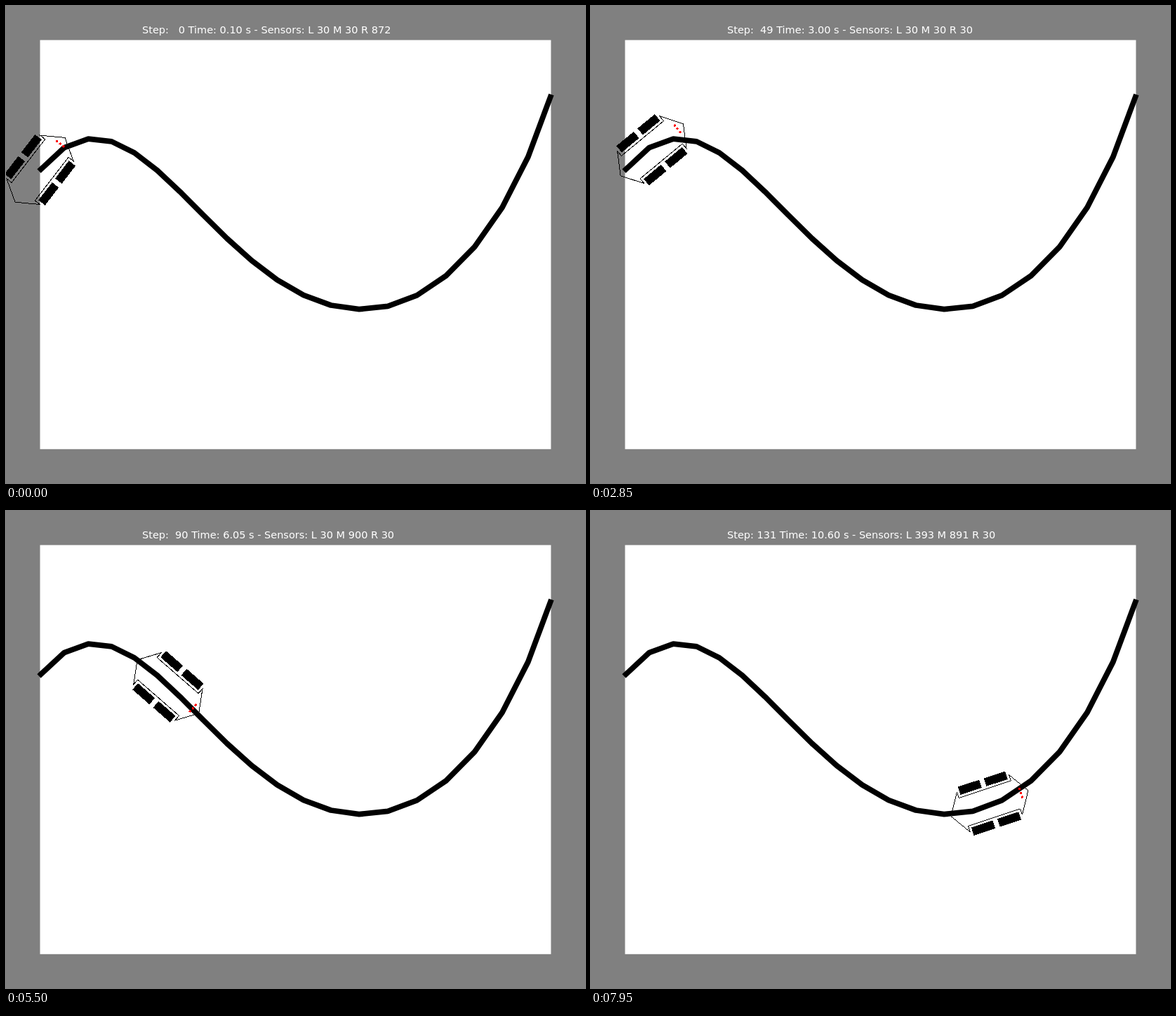
Write an HTML page that moves like this. It is 825x679 px and loops after 8 s.

```html
<!DOCTYPE html>
<html>
<head>
<meta charset="utf-8">
<style>
  html, body { margin: 0; width: 100%; height: 100%; overflow: hidden; background: #808080; }
  svg { display: block; }
  text { font: 14.5px "DejaVu Sans", sans-serif; fill: #fff; white-space: pre; }
</style>
</head>
<body>
<svg width="825" height="679" viewBox="0 0 825 679">
  <rect x="48.5" y="48.5" width="728" height="582.3" fill="#fff"/>
  <polyline id="track" fill="none" stroke="#000" stroke-width="7.8" stroke-linejoin="bevel"/>
  <g id="robot" shape-rendering="crispEdges">
    <path fill="none" stroke="#000" d="M58 0L39 30V21H-39V30L-58 0L-39 -30V-21H39V-30Z"/>
  </g>
  <text id="status" x="194" y="39"></text>
</svg>
<script>
const LOOP = 8000, LAST_STEP = 131;
const TURN = 4.24, STRIDE = 16;
const SENSOR_X = 47, SENSOR_GAP = 6;
const SWEEP = 6;

// The track is a smooth curve through six key points, drawn in 20 straight pieces.
const keys = [[47, 235], [183, 209], [315, 331], [463, 426], [627, 384], [777, 126]];
const curve = u => [0, 1].map(axis => keys.reduce((sum, key, i) =>
  sum + keys.reduce((w, _, j) => j === i ? w : w * (u - j) / (i - j), key[axis]), 0));
const track = Array.from({ length: 21 }, (_, i) => curve(i / 4));

// Steps where the display stalls, for that step and the next one.
const stalls = { 33: 200, 69: 150, 75: 150, 79: 150, 111: 150, 117: 150 };
const warmUp = 'L'.repeat(6) + 'R'.repeat(8) + '-' + 'L'.repeat(9);

const clamp01 = v => Math.max(0, Math.min(1, v));

function heading(angle) {
  const a = angle * Math.PI / 180;
  return [Math.cos(a), Math.sin(a)];
}

function distanceToTrack(x, y) {
  let best = Infinity;
  for (let i = 1; i < track.length; i++) {
    const [ax, ay] = track[i - 1], dx = track[i][0] - ax, dy = track[i][1] - ay;
    const k = clamp01(((x - ax) * dx + (y - ay) * dy) / (dx * dx + dy * dy));
    best = Math.min(best, Math.hypot(x - ax - k * dx, y - ay - k * dy));
  }
  return best;
}

// Left, middle and right reading: 30 on white, 900 on black.
function readSensors({ x, y, angle }) {
  const [c, s] = heading(angle);
  return [-SENSOR_GAP, 0, SENSOR_GAP].map(side => {
    const d = distanceToTrack(x + SENSOR_X * c - side * s, y + SENSOR_X * s + side * c);
    return Math.round(30 + 870 * clamp01((5 - d) / 3));
  });
}

// Follows the line; when it is lost, sweeps left and then right until it is found.
function createPilot() {
  let searched = SWEEP;
  return ([l, m, r]) => {
    if (m < 570 && l < 300 && r < 300) return searched++ < SWEEP ? 'L' : 'R';
    searched = 0;
    return m >= 570 ? 'F' : l > r ? 'L' : 'R';
  };
}

function simulate() {
  const pose = { x: 48.5, y: 233.3, angle: -52.3 };
  const pilot = createPilot();
  const states = [{ ...pose, at: 0, clock: 0.1, sensors: readSensors(pose) }];
  let at = 0, clock = 0.1, previous = '-';
  for (let step = 1; step <= LAST_STEP; step++) {
    const sensors = readSensors(pose);
    const action = warmUp[step - 1] || pilot(sensors);
    if (action === 'F') {
      const [c, s] = heading(pose.angle);
      pose.x += STRIDE * c;
      pose.y += STRIDE * s;
    } else if (action !== '-') {
      pose.angle += action === 'R' ? TURN : -TURN;
    }
    clock += { F: 0.15, '-': 0.2 }[action] || 0.05;
    at += previous === '-' ? 100 : stalls[step] || stalls[step - 1] || 50;
    previous = action;
    states.push({ ...pose, at, clock, sensors });
  }
  return states;
}

const robot = document.getElementById('robot');
const status = document.getElementById('status');

function addBlock(cx, cy, width, height, fill) {
  const block = document.createElementNS('http://www.w3.org/2000/svg', 'rect');
  const attributes = { x: cx - width / 2, y: cy - height / 2, width, height, fill };
  for (const name in attributes) block.setAttribute(name, attributes[name]);
  robot.append(block);
}

for (const x of [-19.5, 19.5]) for (const y of [-30.5, 30.5]) addBlock(x, y, 32, 12, '#000');
for (const side of [-1, 0, 1]) addBlock(SENSOR_X, side * SENSOR_GAP, 3, 3, '#f00');
document.getElementById('track').setAttribute('points', track.join(' '));

const states = simulate();

function draw() {
  const t = performance.now() % LOOP;
  let step = LAST_STEP;
  while (states[step].at > t) step--;
  const { x, y, angle, clock, sensors: [l, m, r] } = states[step];
  robot.setAttribute('transform', `translate(${x} ${y}) rotate(${angle})`);
  status.textContent = `Step: ${String(step).padStart(3)} Time: ${clock.toFixed(2)} s - Sensors: L ${l} M ${m} R ${r}`;
  requestAnimationFrame(draw);
}
draw();
</script>
</body>
</html>
```
